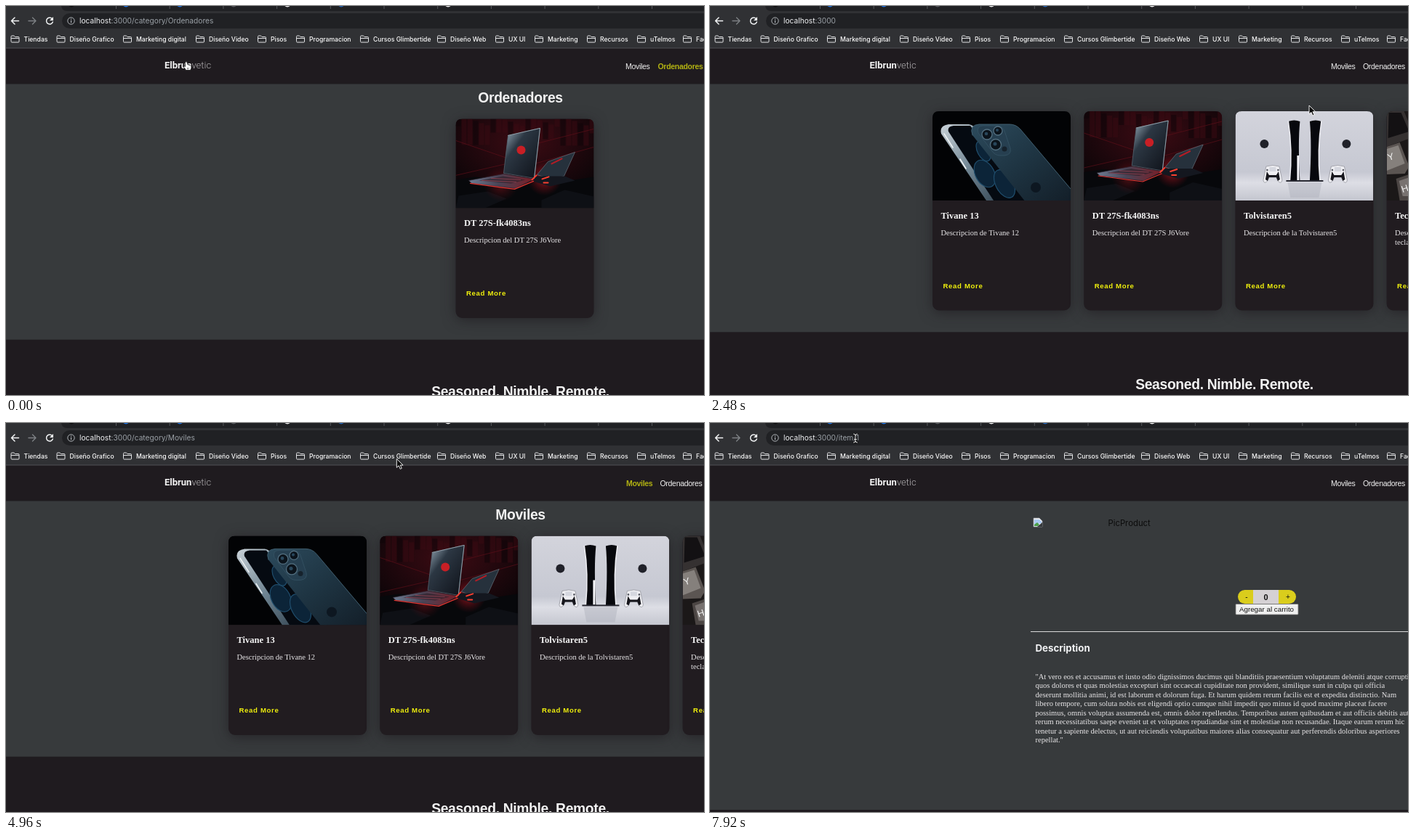
Recreate the animation shown at these times as an HTML page. Size 960 px wide and 536 px high, loop 8 s.

```html
<!DOCTYPE html>
<html lang="es">
<head>
<meta charset="utf-8">
<title>Tienda</title>
<style>
  html, body { margin: 0; width: 100%; height: 100%; overflow: hidden; background: #373a3c; }
  svg { display: block; width: 960px; height: 536px; }
  text { white-space: pre; }
  .ui { font-family: Inter, Roboto, sans-serif; fill: #f1f2f4; }
  .mark { font-size: 8.65px; font-weight: 500; fill: #fafafa; }
  .url { font-size: 10.2px; }
  .dim { fill: #9aa0a6; }
  .brand { font: 700 13px Roboto, sans-serif; fill: #f2f2f2; }
  .brand tspan { font-weight: 300; fill: #b4b2b4; }
  .sans { font-family: "Liberation Sans", Arial, sans-serif; fill: #f2f2f2; }
  .nav { font-size: 10.5px; letter-spacing: -.3px; }
  .active, [data-hover=nav] .first { fill: #b3b312; }
  .active { font-weight: 700; }
  .big { font-size: 19.3px; font-weight: 700; letter-spacing: -.33px; text-anchor: middle; }
  .serif { font-family: "Liberation Serif", Times, serif; font-size: 10.5px; fill: #e8e6e8; }
  .name { font-size: 12.5px; font-weight: 700; fill: #f5f5f5; }
  .more { font-size: 9.6px; font-weight: 700; letter-spacing: .65px; fill: #f0f00c; }
  .rule { stroke: #c01818; visibility: hidden; }
  [data-hover=more] .more { fill: #b3b312; }
  [data-hover=more] .rule { visibility: visible; }
  .card { filter: drop-shadow(0 3px 9px rgba(20, 14, 20, .5)); }
</style>
</head>
<body>
<svg id="stage" viewBox="0 0 960 536">
  <defs>
    <clipPath id="photo"><path d="M0 123V9Q0 0 9 0H181Q190 0 190 9V123Z"/></clipPath>
    <linearGradient id="back" x1="0" y1="0" x2="1" y2="1">
      <stop offset="0" stop-color="#2c4a5c"/><stop offset=".5" stop-color="#1e3442"/><stop offset="1" stop-color="#131e28"/>
    </linearGradient>
    <linearGradient id="steel" x1="0" y1="0" x2="1" y2="1">
      <stop offset="0" stop-color="#c9d2d8"/><stop offset=".45" stop-color="#6f8492"/><stop offset="1" stop-color="#22323e"/>
    </linearGradient>
    <radialGradient id="dusk" cx=".5" cy=".25" r=".65">
      <stop offset="0" stop-color="#3d0b13"/><stop offset=".5" stop-color="#24080e"/><stop offset="1" stop-color="#0d0508"/>
    </radialGradient>
    <linearGradient id="lid" x1="0" y1="0" x2="1" y2="1">
      <stop offset="0" stop-color="#a3b7c4"/><stop offset=".35" stop-color="#2c3743"/><stop offset="1" stop-color="#0d1017"/>
    </linearGradient>
    <linearGradient id="deck" x1="0" y1="0" x2="1" y2="0">
      <stop offset="0" stop-color="#6d7c92"/><stop offset=".45" stop-color="#4a4456"/><stop offset="1" stop-color="#7a1d26"/>
    </linearGradient>
    <radialGradient id="glow">
      <stop offset="0" stop-color="#f02c24"/><stop offset=".4" stop-color="#b01420" stop-opacity=".6"/><stop offset="1" stop-color="#800c18" stop-opacity="0"/>
    </radialGradient>
    <linearGradient id="room" x1="0" y1="0" x2="0" y2="1">
      <stop offset="0" stop-color="#d3d4dc"/><stop offset=".68" stop-color="#c6c8d2"/><stop offset=".8" stop-color="#dddee5"/><stop offset="1" stop-color="#c4c6cf"/>
    </linearGradient>
  </defs>
  <g id="page"></g>
  <g id="browser"></g>
  <g id="cursor"></g>
</svg>
<script>
const $ = id => document.getElementById(id);
const LOOP = 8000, STEP = 80;

const rect = (x, y, w, h, fill, more = '') =>
  `<rect x="${x}" y="${y}" width="${w}" height="${h}" fill="${fill}" ${more}/>`;
const path = (d, fill, more = '') => `<path d="${d}" fill="${fill}" ${more}/>`;
const line = (d, stroke, width = 1) =>
  path(d, 'none', `stroke="${stroke}" stroke-width="${width}" stroke-linecap="round" stroke-linejoin="round"`);
const dot = (x, y, r, fill, more = '') => `<circle cx="${x}" cy="${y}" r="${r}" fill="${fill}" ${more}/>`;
const text = (x, y, cls, str, more = '') => `<text x="${x}" y="${y}" class="${cls}" ${more}>${str}</text>`;
const at = (x, y, body, more = '') => `<g transform="translate(${x} ${y})" ${more}>${body}</g>`;

// Product pictures, each 190 by 123
const lens = (x, y, r) => dot(x, y, r, '#0b131b', 'stroke="#526e7f" stroke-width="1.3"') + dot(x - 1, y - 1, r / 3, '#28465b');
const bubble = (x, y, rx, ry) =>
  `<ellipse cx="${x}" cy="${y}" rx="${rx}" ry="${ry}" fill="#0c2438" stroke="#1f4d6c" stroke-width="1.2" transform="rotate(-28 ${x} ${y})"/>`;
const photos = {
  phone: () => rect(0, 0, 190, 123, '#020305') +
    path('M12 31Q9 20 22 18H50Q57 19 63 28L135 123H74Z', 'url(#steel)') +
    path('M22 28Q20 21 29 20H52L132 123H84Z', '#050a11') +
    bubble(70, 55, 8, 15) + bubble(72, 86, 13, 20) + bubble(99, 100, 12, 21) +
    line('M16 31L28 50M38 66L46 79', '#eef2f4', 1.6) +
    path('M55 33Q50 19 64 18H106Q115 18 121 25L193 110V125H128Z', 'url(#back)') +
    line('M55 33Q50 19 64 18H106Q115 18 121 25L190 107', '#456475', .9) +
    path('M63 30Q60 20 70 20H88Q96 20 99 27L107 51Q109 60 99 61H93Q86 61 82 55Z', '#263f50', 'stroke="#385767" stroke-width=".7"') +
    lens(75, 32, 7) + lens(90, 27, 6) + lens(87, 46, 7.5) + dot(99, 52, 3.5, '#16222c') +
    dot(142, 105, 7, '#0d1721'),

  laptop: () => {
    let bricks = '';
    for (let i = 0; i < 24; i++)
      bricks += rect(i * 8, (i * 37) % 17 - 6, 7, 16 + (i * 23) % 26, i % 3 ? '#3a0b13' : '#0e0508', 'opacity=".5"');
    return rect(0, 0, 190, 123, 'url(#dusk)') + bricks +
      line('M0 30L76 56M0 78L70 62M112 34L190 14M108 62L190 39', '#5c0f19', .7) +
      path('M0 84L26 80L135 88L190 80V123H0Z', '#07080b') +
      path('M4 106L44 100L70 110L40 123H0ZM118 112L150 98L190 107V123H118Z', '#0e1015') +
      dot(122, 82, 24, 'url(#glow)', 'opacity=".75"') + dot(62, 90, 24, 'url(#glow)', 'opacity=".4"') +
      path('M112 77L127 59L164 46L149 79L132 84Z', '#26313c', 'stroke="#65717c" stroke-width=".7"') +
      line('M132 62L146 55', '#b51c25', 2) +
      path('M111 79L150 79L164 85L130 93L106 86Z', '#14171f') +
      path('M72 23L116 13L108 82L66 75Z', 'url(#lid)', 'stroke="#54646f" stroke-width=".8"') +
      line('M72 23L116 13L108 82', '#9fb1bc', .8) +
      path('M18 85L66 76L108 83L82 96L22 89Z', 'url(#deck)', 'stroke="#332833" stroke-width=".7"') +
      path('M32 85L65 79L96 84L76 89Z', '#2b2029', 'opacity=".65"') +
      line('M20 89L81 97L107 86', '#e03530', 1.2) + line('M36 85L83 87M49 82L89 84', '#a7485a', .7) +
      line('M105 84L111 78M119 83L128 80M121 88L127 88', '#ff4030', 2) +
      dot(90, 43, 6, '#c81f25');
  },

  console: () => {
    const pad = x => at(x, 87, path('M-9 -11Q0 -14 9 -11L13 8Q12 14 7 9L5 4H-5L-7 9Q-12 14 -13 8Z', '#eeeef2', 'stroke="#8b8d96" stroke-width=".7"') +
      path('M-8 -4L-5 1H5L8 -4L10 7L7 9L5 4H-5L-7 9L-10 7Z', '#16161c') + rect(-4.5, -10, 9, 6, '#d5d7df') +
      dot(-7.5, -6, 1.3, '#555862') + dot(7.5, -6, 1.3, '#555862'));
    const tower = (x, s) => at(x, 0, `<g transform="scale(${s} 1)">` +
      path('M-8 14Q0 11 8 14Q5 44 8 96H-6Q-2 52 -8 14Z', '#07080d') + line('M-8 14Q-2 52 -6 96', '#f0f0f5', 1.5) + '</g>');
    return rect(0, 0, 190, 123, 'url(#room)') +
      path('M72 98H119L115 119H76Z', '#aeb0bb', 'opacity=".45"') +
      tower(81, 1) + tower(110.5, -1) + path('M85 61H88V95H85Z', '#f6f6fa') + rect(70, 95, 51, 2, '#282932') +
      pad(51.5) + pad(141) + dot(40, 45, 6, '#202129') + dot(153, 45, 6, '#202129');
  },

  keys: () => rect(0, 0, 190, 123, '#1b1818') +
    path('M0 0H24L38 35L0 49Z', '#353131') + path('M3 2H20L31 28L2 37Z', '#131113') +
    path('M0 49L18 43L31 76L25 86L0 87Z', '#5b5552') + path('M0 52L16 47L25 72L0 82Z', '#85807c') +
    path('M13 93L40 84V123H18Z', '#4c4644') + path('M17 96L40 88V117H22Z', '#787270') +
    text(1, 67, 'sans', 'Y', 'font-size="13" transform="rotate(-18 6 62)"') +
    text(20, 111, 'sans', 'H', 'font-size="13" transform="rotate(-18 25 106)"')
};

const goods = {
  phone: ['Tivane 13', 'Descripcion de Tivane 12'],
  laptop: ['DT 27S-fk4083ns', 'Descripcion del DT 27S J6Vore'],
  console: ['Tolvistaren5', 'Descripcion de la Tolvistaren5'],
  keys: ['Teclado', 'Descripcion del', 'teclado']
};
const all = Object.keys(goods);

function card(kind, x, y) {
  const [name, ...notes] = goods[kind];
  return at(x, y, rect(0, 0, 190, 274.5, '#211c20', 'rx="9" class="card"') +
    `<g clip-path="url(#photo)">${photos[kind]()}</g>` +
    text(11.5, 147.5, 'serif name', name) +
    notes.map((s, i) => text(11.5, 171 + i * 12.5, 'serif', s)).join('') +
    text(14.5, 243.7, 'sans more', 'Read More') +
    path('M14 246H70', 'none', 'class="rule"'));
}

function header(active) {
  const phones = active === 'Moviles', pcs = active === 'Ordenadores';
  return rect(0, 58, 960, 49.5, '#1f1b1f') +
    text(active ? 218 : 219.5, 85.7, 'brand', 'Elbrun<tspan>vetic</tspan>') +
    text(phones ? 853 : pcs ? 852 : 854, 86.7, 'sans nav first' + (phones ? ' active' : ''), 'Moviles') +
    text(phones ? 899.5 : pcs ? 896.5 : 898, 86.7, 'sans nav' + (pcs ? ' active' : ''), 'Ordenadores');
}

function shop(title, kinds) {
  const dy = title ? 10.4 : 0, left = kinds.length > 1 ? 306 : 618.5;
  return rect(0, 107, 960, 429, '#373a3c') + header(title) +
    text(707.5, 132.7, 'sans big', title) +
    kinds.map((kind, i) => card(kind, left + i * 208.2, 145 + dy)).join('') +
    rect(0, 449.3 + dy, 960, 90, '#1f1b1f') +
    text(707.5, 527.8 + dy, 'sans big', 'Seasoned. Nimble. Remote.');
}

const copy = [
  '"At vero eos et accusamus et iusto odio dignissimos ducimus qui blanditiis praesentium voluptatum deleniti atque corrupti',
  'quos dolores et quas molestias excepturi sint occaecati cupiditate non provident, similique sunt in culpa qui officia',
  'deserunt mollitia animi, id est laborum et dolorum fuga. Et harum quidem rerum facilis est et expedita distinctio. Nam',
  'libero tempore, cum soluta nobis est eligendi optio cumque nihil impedit quo minus id quod maxime placeat facere',
  'possimus, omnis voluptas assumenda est, omnis dolor repellendus. Temporibus autem quibusdam et aut officiis debitis aut',
  'rerum necessitatibus saepe eveniet ut et voluptates repudiandae sint et molestiae non recusandae. Itaque earum rerum hic',
  'tenetur a sapiente delectus, ut aut reiciendis voluptatibus maiores alias consequatur aut perferendis doloribus asperiores',
  'repellat."'
];

function item() {
  const black = (x, y, size, str, weight = 400) =>
    text(x, y, 'sans', str, `style="fill:#111;text-anchor:middle;font-size:${size}px;font-weight:${weight}"`);
  return rect(0, 107, 960, 429, '#373a3c') + header('') +
    at(445, 131, path('M0 0H8L12 4V12H0Z', '#f0f2f5', 'stroke="#9ba0a6" stroke-width=".7"') +
      path('M1 2H8L11 5V7L1 9Z', '#a9c8f0') + path('M1 11V9L5 6L8 9L6 11Z', '#4ba04b') + path('M12 6L5 12H12Z', '#373a3c')) +
    text(547.5, 142, 'ui', 'PicProduct', 'style="fill:#0c0c0c;font-size:11.3px"') +
    rect(726, 230, 80, 19, '#dacd1c', 'rx="9.5"') + rect(747, 230, 35, 19, '#d5d1d4') +
    black(738, 243, 10, '-') + black(764.5, 243.5, 11, '0', 700) + black(795, 243, 10, '+') +
    rect(723, 249.5, 86, 14.5, '#efefef', 'stroke="#777" stroke-width=".8" rx="1"') +
    black(765.5, 260.3, 9.8, 'Agregar al carrito') +
    rect(441, 287, 519, 1, '#d9d9d9') +
    text(447.5, 315.2, 'ui', 'Description', 'font-size="13.3" font-weight="700"') +
    copy.map((s, i) => text(447.5, 352.5 + i * 12.57, 'serif', s)).join('') +
    rect(0, 533, 960, 3, '#1f1b1f');
}

const bookmarks = [
  [24.5, 'Tiendas'], [87.5, 'Diseño Grafico'], [179, 'Marketing digital'], [279, 'Diseño Video'], [364, 'Pisos'],
  [417, 'Programacion'], [505, 'Cursos Glimbertide'], [611, 'Diseño Web'], [691, 'UX UI'], [745, 'Marketing'],
  [817, 'Recursos'], [886, 'uTelmos'], [949, 'Facturas']
];

function browser() {
  const folder = x => at(x, 40.5, line('M.5 1.5Q.5 .5 1.5 .5H4.5L6 2H10.5Q11.5 2 11.5 3V8.5Q11.5 9.5 10.5 9.5H1.5Q.5 9.5 .5 8.5ZM1 4H11', '#e3e4e6', 1));
  let tabs = '';
  for (let i = 0; i < 11; i++) tabs += rect(151 + i * 73.7, 0, 1, 4, '#55575b');
  const icons = [[90, '#0b0b0c'], [165, '#1a73e8'], [239, '#1a73e8'], [313, '#55585c'], [387, '#eeeeee'], [461, '#2264b8'], [608, '#eeeeee']];
  return rect(0, 0, 960, 58, '#303134') + path('M76 0Q77 7 84 7H960V0Z', '#202124') + tabs +
    icons.map(([x, c]) => dot(x, -3.5, 5, c)).join('') +
    rect(77, 10, 900, 21, '#202124', 'rx="10.5"') + rect(0, 57.5, 960, 1, '#505154') +
    line('M17.5 20.5H8M12 16L7.5 20.5L12 25', '#f1f3f4', 1.5) +
    line('M31 20.5H40.5M36.5 16L41 20.5L36.5 25', '#7d8084', 1.4) +
    line('M63.4 17.5A4.5 4.5 0 1 0 64.3 22', '#f1f3f4', 1.5) + path('M65 15V20H60Z', '#f1f3f4') +
    dot(89.5, 20.5, 4.7, 'none', 'stroke="#b4b8bc"') + rect(89, 19.7, 1.1, 3.5, '#b4b8bc') + rect(89, 17.5, 1.1, 1.2, '#b4b8bc') +
    `<text x="101" y="24.3" class="ui url">localhost<tspan class="dim" id="tail"></tspan></text>` +
    bookmarks.map(([x, s]) => folder(x - 18) + text(x, 48.8, 'ui mark', s)).join('');
}

const beam = 'M-2.5 -6Q0 -6 0 -4V4Q0 6 -2.5 6M2.5 -6Q0 -6 0 -4M0 4Q0 6 2.5 6M-1.5 1.5H1.5';
const pointers = {
  arrow: path('M0 0V12L2.9 9.4L4.9 14L7 13L5 8.7H8.8Z', '#0a0a0a', 'stroke="#fff" stroke-width=".9"'),
  hand: path('M-1 0Q.2 -1 1 .5L2 4Q3.3 3.2 4 4.5Q5.2 4 5.7 5.2Q7 5 7 6.8Q7 9.5 5.5 11.5H-.5Q-1.5 9 -4 7Q-3.5 5.2 -1.2 6.3L-1.8 1.2Z', '#fff', 'stroke="#151515" stroke-width=".8"') +
    line('M1.5 8.3V10M3.2 8.3V10', '#222', .6),
  beam: line(beam, '#0b0b0b', 2.2) + line(beam, '#eee', 1)
};

const scenes = [
  [0, '/category/Ordenadores', shop('Ordenadores', ['laptop'])],
  [480, '', shop('', ['laptop'])],
  [2000, '', shop('', all)],
  [4240, '/category/Moviles', shop('Moviles', all)],
  [5760, '/category/Moviles', shop('Moviles', ['phone'])],
  [7120, '/item/1', item()]
];
const moves = [
  [0, 248, 77], [480, 248, 77], [880, 250.5, 79], [1600, 250.5, 79], [2400, 824, 137], [3360, 824, 137],
  [4000, 867, 84], [4320, 867, 84], [5520, 267.5, 21], [6080, 267.5, 21], [6880, 655, 398.5], [7120, 655, 398.5],
  [7760, 200, 21], [LOOP, 200, 21]
];
const links = [['logo', 217, 72, 286, 92], ['nav', 850, 76, 889, 92], ['more', 632, 387, 689, 402]];

function pointAt(t) {
  const i = moves.findIndex(m => m[0] > t);
  const [t0, x0, y0] = moves[i - 1], [t1, x1, y1] = moves[i];
  const u = (t - t0) / (t1 - t0), k = u * u * (3 - 2 * u);
  return [x0 + (x1 - x0) * k, y0 + (y1 - y0) * k];
}

let shown, shape;
function draw(now) {
  const t = Math.floor(now % LOOP / STEP) * STEP;
  const scene = scenes.filter(s => s[0] <= t).pop();
  if (scene !== shown) {
    shown = scene;
    $('page').innerHTML = scene[2];
    $('tail').textContent = ':3000' + scene[1];
  }
  const [x, y] = pointAt(t);
  const link = links.find(([, l, top, r, b]) => x > l && x < r && y > top && y < b);
  $('stage').dataset.hover = link ? link[0] : '';
  const kind = link ? 'hand' : y < 32 && x > 77 ? 'beam' : 'arrow';
  if (kind !== shape) $('cursor').innerHTML = pointers[shape = kind];
  $('cursor').setAttribute('transform', `translate(${x.toFixed(1)} ${y.toFixed(1)})`);
}

$('browser').innerHTML = browser();
const start = performance.now();
function tick() {
  draw(performance.now() - start);
  requestAnimationFrame(tick);
}
tick();
</script>
</body>
</html>
```
